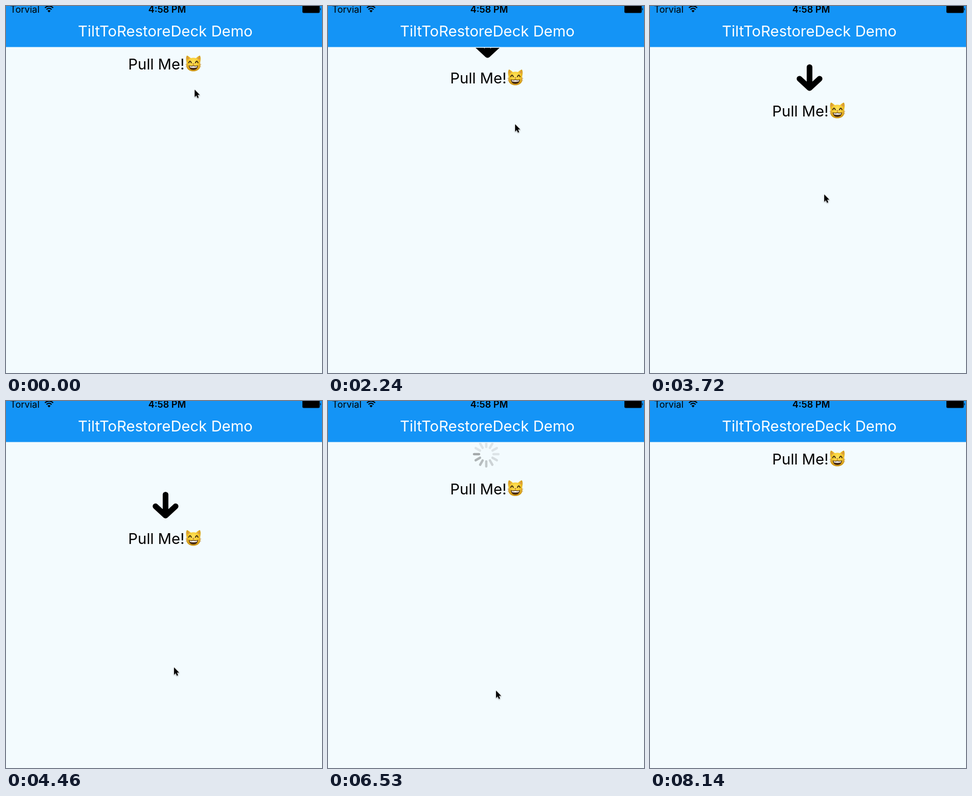
An HTML page for the animation above (9.1 s loop, 613x711 px).

```html
<!DOCTYPE html>
<html lang="en">
<head>
<meta charset="utf-8">
<title>Pull to refresh</title>
<style>
  html, body { margin: 0; width: 100%; height: 100%; overflow: hidden; background: #f3fbfe; }
  svg { display: block; }
  text { font-family: Inter, "Liberation Sans", sans-serif; font-size: 29px; }
  .status { font-size: 18px; }
  #cursor { filter: drop-shadow(0 1px 1px #0006); }
</style>
</head>
<body>
<svg width="613" height="711" viewBox="0 0 613 711">
  <defs>
    <radialGradient id="fur" cx=".5" cy=".4" r=".62">
      <stop offset="0" stop-color="#ffe45c"/>
      <stop offset=".6" stop-color="#f3c62b"/>
      <stop offset="1" stop-color="#c98d10"/>
    </radialGradient>
  </defs>
  <rect width="613" height="711" fill="#f3fbfe"/>

  <g id="content">
    <path id="arrow" d="M309.5 27.5V67M290 50L309.5 68L329 50" fill="none" stroke="#000"
      stroke-width="11" stroke-linecap="round" stroke-linejoin="round"/>
    <g id="spinner" transform="translate(307 45.5)"></g>
    <text x="237" y="123">Pull Me!</text>
    <g id="cat" transform="translate(363.5 111)">
      <path d="M-13-1C-14.500-7-14.500-12-12.500-15C-9.500-14-7-12-5-10Q0-11.500 5-10C7-12 9.500-14 12.500-15C14.500-12 14.500-7 13-1C16 8 10 15.500 0 15.500S-16 8-13-1Z" fill="url(#fur)"/>
      <path d="M-12-7L-11.500-12.500L-7-9.500ZM12-7L11.500-12.500L7-9.500Z" fill="#d9964a"/>
      <path d="M-9-1Q-6.500-7-4-1M4-1Q6.500-7 9-1" fill="none" stroke="#3d2a10" stroke-width="1.900" stroke-linecap="round"/>
      <path d="M-2 .5H2L0 3Z" fill="#b5653c"/>
      <path d="M-9 4Q-4 6 0 4Q4 6 9 4C8.500 10 5 13 0 13S-8.500 10-9 4Z" fill="#4a2c12"/>
      <path d="M-7.500 5.500Q-3.500 7 0 5.500Q3.500 7 7.500 5.500L6.500 8Q0 9.500-6.500 8Z" fill="#fff"/>
      <path d="M-15.500 2L-10.500 3M-15 7L-10.500 5.500M15.500 2L10.500 3M15 7L10.500 5.500" stroke="#c79a72" stroke-width=".8"/>
    </g>
  </g>

  <rect y="79" width="613" height="2" fill="#f3fbfe"/>
  <rect width="613" height="79.500" fill="#1494f6"/>
  <text x="309" y="58.500" fill="#fff" text-anchor="middle">TiltToRestoreDeck Demo</text>
  <text class="status" x="8" y="13">Torvial</text>
  <text class="status" x="312.500" y="13" text-anchor="middle" font-weight="600">4:58 PM</text>
  <g fill="none" stroke="#000" stroke-width="2.200">
    <path d="M75.500 3.500Q83.500-3.500 91.500 3.500M78.500 6.700Q83.500 2 88.500 6.700"/>
    <path d="M83.500 12.500L80.500 9.300Q83.500 6.800 86.500 9.300Z" fill="#000" stroke="none"/>
  </g>
  <rect x="575" y="-4" width="33.500" height="17.500" rx="2.500" fill="#000"/>
  <path d="M609.500 3.500Q612 6 609.500 9Z"/>

  <path id="cursor" d="M0 0V14.200L3.200 11.200L5.500 16.200L7.800 15.200L5.600 10.300H10Z" stroke="#fff" stroke-width="1" paint-order="stroke"/>
</svg>
<script>
const LOOP = 9100, START = 1490, STEP = 147.7;
const $ = id => document.getElementById(id);
const content = $('content'), arrow = $('arrow'), spinner = $('spinner'), cursor = $('cursor');

// [step, value...] keys, linear in between
const offsetKeys = [[-1, 0], [5, 27], [7, 34], [11, 64], [15, 91], [18, 125], [19, 125],
  [20, 154], [22, 175], [32, 175], [33, 100], [34, 57.5], [35, 67], [43, 67], [44, 22], [45, 0]];
const cursorKeys = [[-1, 366, 162], [5, 363, 229], [7, 360, 245], [11, 344, 321], [15, 338, 365],
  [18, 329, 437], [19, 329, 437], [20, 326, 516], [22, 326, 561], [37, 326, 561], [42, 361, 631]];

function sample(keys, step) {
  const next = keys.findIndex(key => key[0] >= step);
  if (next < 0) return keys[keys.length - 1].slice(1);
  if (next === 0) return keys[0].slice(1);
  const a = keys[next - 1], b = keys[next], p = (step - a[0]) / (b[0] - a[0]);
  return a.slice(1).map((v, i) => v + (b[i + 1] - v) * p);
}

const spokes = Array.from({ length: 12 }, (_, i) => {
  const line = document.createElementNS('http://www.w3.org/2000/svg', 'path');
  line.setAttribute('d', 'M0-14V-23.700');
  line.setAttribute('stroke', '#000');
  line.setAttribute('stroke-width', 4.6);
  line.setAttribute('stroke-linecap', 'round');
  line.setAttribute('transform', `rotate(${i * 30})`);
  return spinner.appendChild(line);
});

function draw(now) {
  const step = Math.min(45, Math.max(-1, Math.floor((now % LOOP - START) / STEP)));
  const [offset] = sample(offsetKeys, step);
  const [x, y] = sample(cursorKeys, step);
  const loading = step >= 22 && step < 44;

  content.setAttribute('transform', `translate(0 ${offset})`);
  cursor.setAttribute('transform', `translate(${Math.round(x)} ${Math.round(y)})`);
  cursor.style.display = step < 43 ? '' : 'none';
  arrow.style.display = loading ? 'none' : '';
  spinner.style.display = loading ? '' : 'none';

  const lead = Math.floor(7.3 + (step - 26) * STEP * 12 / 1000);
  spokes.forEach((spoke, i) => {
    const age = ((lead - i) % 12 + 12) % 12;
    spoke.setAttribute('stroke-opacity', Math.max(.09, .33 - .042 * age));
  });
}

const begin = performance.now();
function tick() {
  draw(performance.now() - begin);
  requestAnimationFrame(tick);
}
tick();
</script>
</body>
</html>
```
